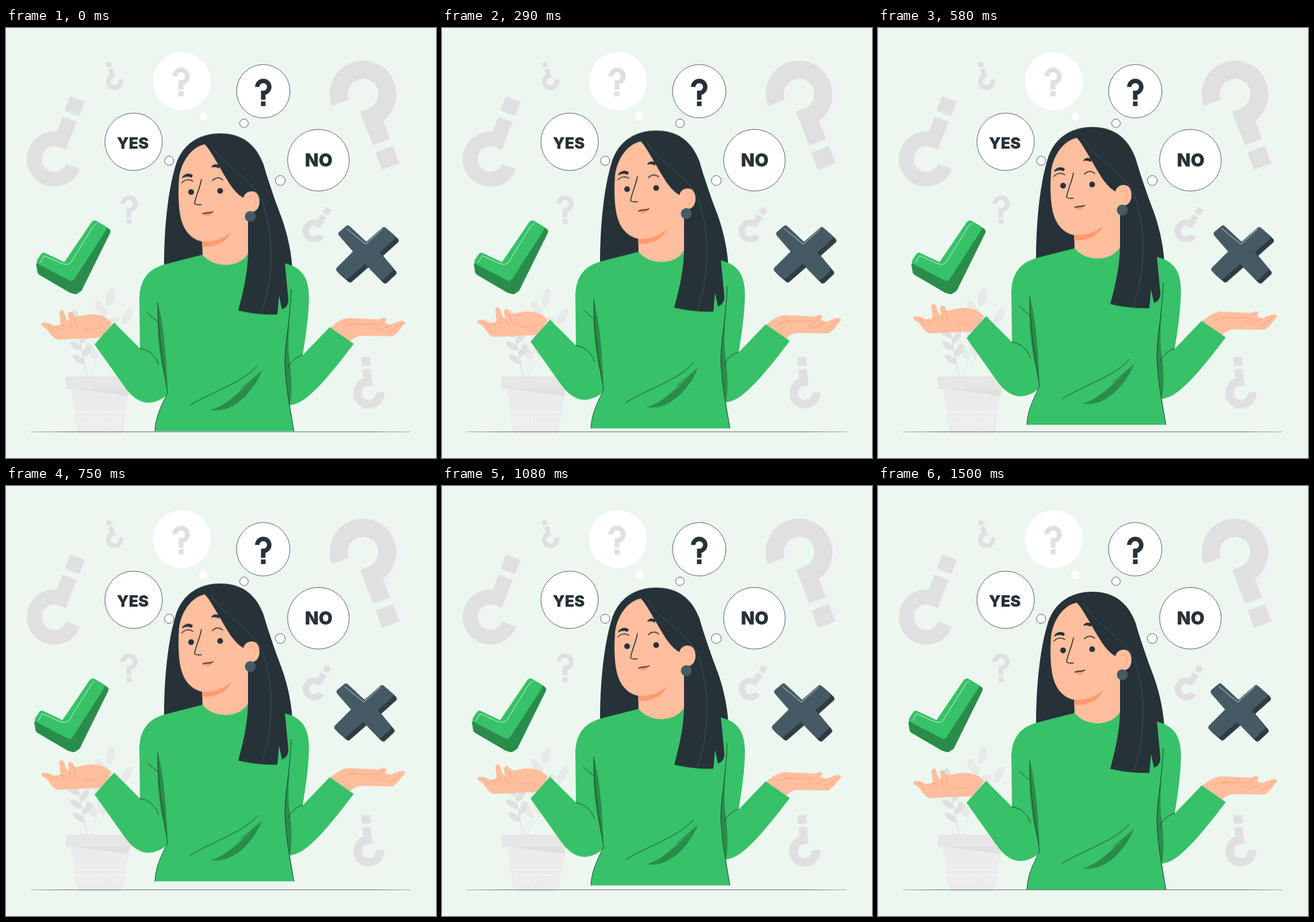
These frames come from a looping animation (748x748 px, 1.54 s). An HTML page:

```html
<!DOCTYPE html>
<html lang="en">
<head>
<meta charset="utf-8">
<title>Yes or no</title>
<style>
  html, body { margin: 0; width: 100%; height: 100%; overflow: hidden; background: #ecf7f0; }
  svg { display: block; width: 100%; height: 100%; }
  text { font-family: Inter, "Open Sans", sans-serif; font-weight: 900; fill: #263238; text-anchor: middle; }
  .ink { fill: #263238; }
  .green { fill: #37c168; }
  .dark { fill: #2a8c4a; }
  .skin { fill: #ffbe9d; }
  .line { fill: none; stroke: #263238; stroke-width: .9; stroke-linecap: round; stroke-linejoin: round; }
  .bold { stroke-width: 1.6; }
  .crease { fill: none; stroke: #ff9a6c; stroke-width: 1; stroke-linecap: round; }
  .shine { fill: none; stroke: #fff; stroke-width: 1; stroke-linecap: round; stroke-linejoin: round; opacity: .8; }
  .slab { stroke-linejoin: round; }
</style>
</head>
<body>
<svg viewBox="0 0 748 748">
  <defs>
    <path id="cross" d="M583 358 595 348 627 378 658 351 673 364 644 390 669 420 654 434 625 404 593 432 579 420 610 389Z"/>
  </defs>

  <g id="marks"></g>

  <g id="plant">
    <g id="leaves"></g>
    <path d="M113 627H215L202 706H125Z" fill="#ebebeb"/>
    <path d="M113 627H215L213 640Z" fill="#e0e0e0"/>
    <rect x="104" y="606" width="118" height="22" rx="2" fill="#e6e6e6"/>
    <path d="M119 668H209M120 677H207" stroke="#f7f7f7" fill="none"/>
    <path d="M126 684H202" stroke="#f7f7f7" stroke-width="16" stroke-dasharray="1 5" fill="none"/>
  </g>

  <path d="M43 702.2 110 702H630L704 702.2V702.7L630 702.9H110L43 702.7Z" class="ink" opacity=".7"/>

  <g id="woman">
    <path class="ink" d="M275 415C275 352 281 286 295 240C304 209 329 185 370 184C413 183 436 206 448 238C457 270 465 293 475 319C487 349 496 384 498 418L470 440 300 420Z"/>
    <path class="skin" d="M341 360 342 398C358 420 405 420 422 394V320Z"/>
    <path class="skin" d="M184 513C172 499 155 498 142 499C132 501 125 503 119 503L116 496C112 493 107 495 108 501L110 511C105 509 104 504 102 498C101 489 92 490 93 497L95 516 84 519C78 515 70 511 63 514C60 516 62 519 66 521C71 524 72 526 76 531C80 537 85 542 90 543L152 540C160 541 166 538 170 538Z"/>
    <path class="crease" d="M110 511C111 516 113 521 118 524M119 503C118 511 121 518 125 521M95 516 103 521M84 519 92 525M72 517 82 526M136 524C145 527 153 526 159 522"/>
    <path class="skin" d="M562 523C575 513 584 506 596 505L638 507C646 508 651 507 655 505C661 503 664 508 659 513L668 517C678 513 687 508 693 511C697 514 691 517 688 521C684 528 678 533 672 537L620 536C610 536 602 541 597 548Z"/>
    <path class="crease" d="M599 514C616 517 632 516 645 515M655 508C651 515 645 521 637 524M668 517C661 522 654 525 645 526M688 515C680 522 673 527 665 529M584 521C592 517 598 516 604 516"/>

    <path class="green" d="M342 395 275 412C245 421 233 441 232 470L233 558 188 513 154 551 205 623C222 648 240 656 258 651C272 647 280 640 281 635C268 662 260 678 259 702H501L494 657C515 654 530 638 548 620C570 596 588 572 605 550L563 521 516 570C521 540 527 500 527 468C526 438 518 424 498 414L480 408 421 393C407 418 362 420 342 395Z"/>
    <path class="dark" d="M264 478C262 530 266 575 281 628C279 580 275 520 264 478Z"/>
    <path class="dark" d="M496 462C494 520 481 560 486 600C489 632 492 650 494 657C499 635 496 600 493 578C489 545 494 500 496 462Z"/>
    <path class="dark" d="M356 665C385 659 419 620 444 600C429 634 395 672 356 665Z"/>
    <path class="line" d="M264 478C264 535 274 590 281 635C268 662 260 678 259 702M496 455C494 520 482 560 486 600C489 642 496 672 501 702M320 657C360 632 412 618 437 588M409 628C424 616 434 608 444 598M233 558C250 560 262 574 265 586M246 496C253 503 259 508 264 511M491 591C495 581 505 573 516 569"/>

    <path class="skin" d="M346 203C322 207 304 235 301 262C299 290 300 320 306 338C313 359 328 373 350 373C372 373 385 363 391 355L421 345 425 285Z"/>
    <path d="M341 372C361 374 381 366 391 355C385 373 365 382 341 381Z" fill="#ff9a6c"/>

    <path class="ink" d="M346 203C357 214 378 256 392 276C400 287 408 294 415 297L421 320V395C420 430 412 462 404 492C425 497 450 500 472 499L475 466 480 490C487 488 492 481 491 471L485 408 478 330 447 238 400 190 350 192Z"/>
    <path d="M357 205C377 238 427 264 445 300C466 358 467 432 444 497" fill="none" stroke="#455a64" stroke-width=".9"/>
    <path class="skin" d="M413 298C413 286 428 281 436 288C444 297 442 315 433 319C429 321 424 321 419 326Z"/>
    <path class="crease" d="M421 296C428 290 435 294 434 302C434 308 431 310 428 313"/>
    <circle cx="425" cy="328.5" r="9.5" fill="#455a64"/>

    <path class="ink" d="M306 262C308 255 319 251 325 257L323 261C317 258 312 259 306 262ZM357 243C360 236 369 237 372 241L370 245C366 242 362 242 357 243Z"/>
    <path class="line bold" d="M306 270C311 264 319 263 325 267M359 266C365 260 372 260 377 265"/>
    <circle class="ink" cx="322" cy="286" r="5"/>
    <circle class="ink" cx="372.5" cy="284" r="5"/>
    <path class="line bold" d="M340 264C337 280 330 293 328 306C331 309 335 308 340 308"/>
    <path d="M343 323C349 318 354 320 358 321C358 326 353 328 350 328C347 328 345 326 343 323Z" fill="#ff9a6c"/>
    <path class="line bold" d="M342 324C348 321 354 324 360 320"/>
  </g>

  <g id="signs">
    <g class="slab" stroke-width="12">
      <path d="M155 341 176 354 127 453 121 457 114 455 61 424 59 412 104 415Z" fill="#2a8c4a" stroke="#2a8c4a"/>
      <path d="M154 341 169 349 114 434 60 406 66 397 104 415Z" fill="#37c168" stroke="#37c168"/>
      <path class="shine" d="M158 340 152 345 113 408C108 413 101 411 96 409L67 396 60 408"/>
    </g>
    <g class="slab" stroke-width="9">
      <g fill="#2f3c44" stroke="#2f3c44">
        <use href="#cross" x="6" y="6"/><use href="#cross" x="3" y="3"/>
      </g>
      <use href="#cross" fill="#455a64" stroke="#455a64"/>
      <path class="shine" d="M593 349 626 376 655 350"/>
    </g>
  </g>

  <g id="bubbles"></g>
  <text x="220.5" y="209.5" font-size="27">YES</text>
  <text x="544" y="240.5" font-size="31">NO</text>
</svg>

<script>
const $ = id => document.getElementById(id);
const ink = '#263238', grey = '#e0e0e0', pale = '#e6e6e6', lit = '#e7eae8';

// Question mark built from its ring: centre, outer radius and turn.
function mark(x, y, r, turn, color = grey, depth = 0) {
  const a = r * .73, dot = r * .56, reach = r * 2.05;
  const shape = (fill, shift) =>
    `<g transform="translate(${x + shift} ${y}) rotate(${turn})">
      <path d="M${-a} 0A${a} ${a} 0 1 1 0 ${a}V${reach - r * .5}" fill="none" stroke="${fill}" stroke-width="${r * .54}"/>
      <rect x="${-dot / 2}" y="${reach - dot / 2}" width="${dot}" height="${dot}" fill="${fill}"/>
    </g>`;
  return shape('#f2f2f2', r * depth) + shape(color, 0);
}

$('marks').innerHTML =
  mark(621, 115, 58, -21, grey, .17) +
  mark(84, 228, 48, 201, grey, .13) +
  mark(189, 93, 15, 161, grey, .13) +
  mark(536, 353, 20, 213, grey, .13) +
  mark(631, 635, 27, 175, grey, .17) +
  mark(214, 306, 15, 0);

// Stem with leaves on alternating sides and one at the tip.
function branch(x, y, dx, dy, count, size, color) {
  const lean = Math.atan2(dx, -dy) * 180 / Math.PI;
  let out = `<path d="M${x} ${y}l${dx} ${dy}" stroke="${color}" stroke-width="1.5"/>`;
  for (let i = 0; i <= count; i++) {
    const t = .25 + .75 * i / count;
    const side = i === count ? 0 : i % 2 ? 1 : -1;
    out += `<ellipse cy="${-size}" rx="${size * .45}" ry="${size}" fill="${color}"
      transform="translate(${x + dx * t} ${y + dy * t}) rotate(${lean + side * 45})"/>`;
  }
  return out;
}

$('leaves').innerHTML =
  branch(150, 606, 28, -122, 5, 16, lit) +
  branch(160, 590, 42, -74, 3, 16, lit) +
  branch(141, 606, -18, -92, 6, 12, grey);

// Thought bubble with a smaller one trailing off at the given angle.
function bubble(x, y, r, angle, stroke) {
  const rad = angle * Math.PI / 180;
  const disc = (cx, cy, r) =>
    `<circle cx="${cx}" cy="${cy}" r="${r}" fill="#fff" stroke="${stroke}" stroke-width=".8"/>`;
  return disc(x, y, r) +
    disc(x + r * 1.4 * Math.cos(rad), y + r * 1.4 * Math.sin(rad), r * .16);
}

$('bubbles').innerHTML =
  bubble(306, 92.5, 51.5, 59, pale) +
  bubble(447.5, 110, 46.5, 121, ink) +
  bubble(222, 198, 50, 28, ink) +
  bubble(543.5, 230, 53.7, 152, ink) +
  mark(304.5, 84, 15, 0) +
  mark(447.5, 102.5, 14.3, 0, ink);

const loop = { duration: 1540, iterations: Infinity, delay: -45, easing: 'cubic-bezier(.3, .2, .7, .8)' };
const half = [0, -1, 2, -4, 4];
const shake = [...half, -4, ...half.reverse()];

$('woman').animate({ transform: ['none', 'translateY(-15px)', 'none'] }, loop);
$('signs').animate({ transform: shake.map(x => `translateX(${x * 1.5}px)`) }, loop);
</script>
</body>
</html>
```
